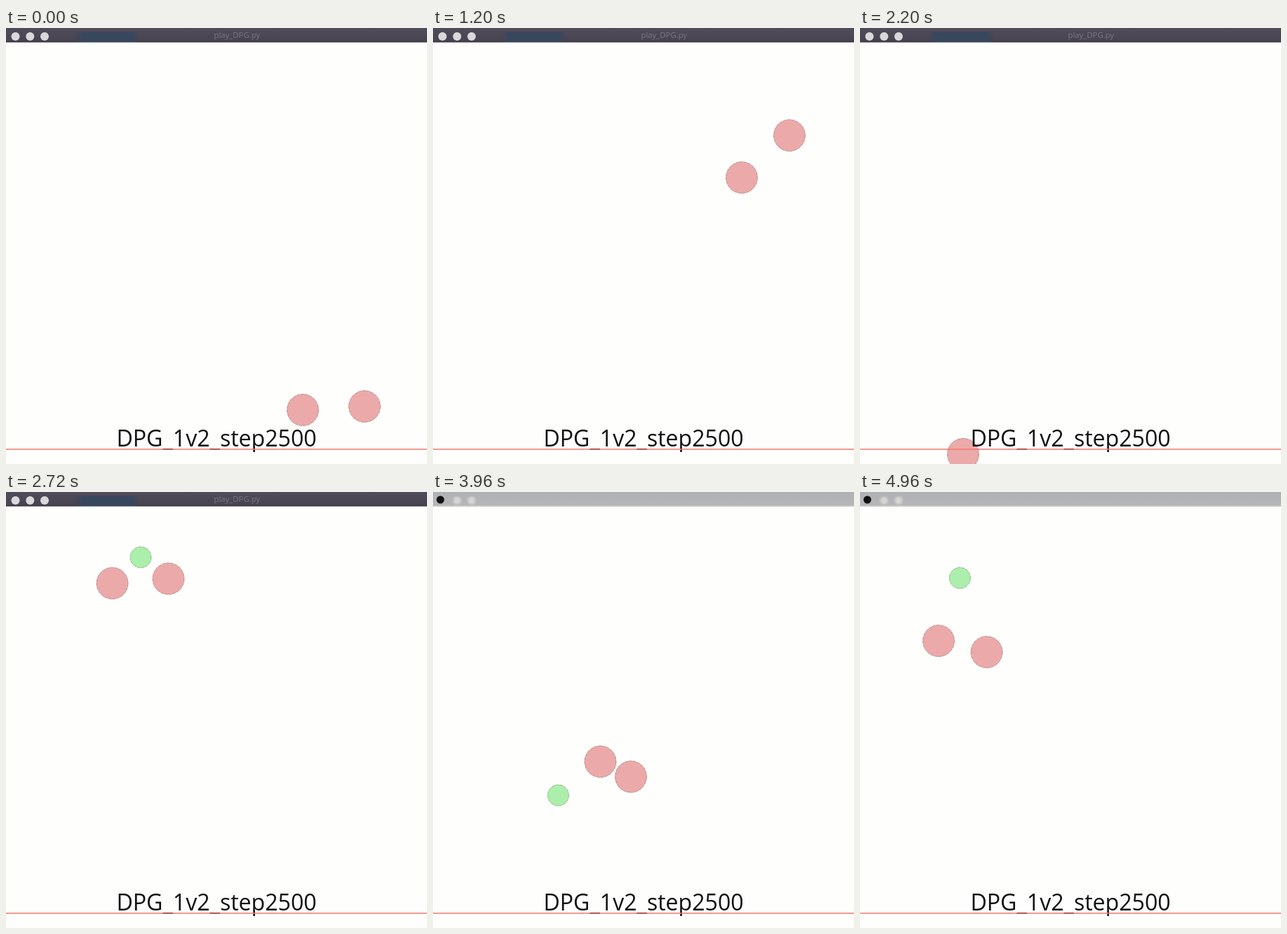
Recreate the animation shown at these times as an HTML page. Size 600 by 621 pixels, loop 5 s.

```html
<!DOCTYPE html>
<html lang="en">
<head>
<meta charset="utf-8">
<title>play_DPG.py</title>
<style>
  html, body { margin: 0; width: 100%; height: 100%; overflow: hidden; background: #fefefd; }
  svg { display: block; width: 600px; height: 621px; }
  text { font-family: "Open Sans", "Noto Sans", sans-serif; }
  .agent { stroke-width: .8; stroke-dasharray: 5 1; }
  .hunter { fill: rgba(217, 89, 86, .5); stroke: rgba(108, 45, 45, .5); }
  .runner { fill: rgba(89, 221, 89, .5); stroke: rgba(45, 108, 45, .5); }
</style>
</head>
<body>
<svg viewBox="0 0 600 621">
  <defs>
    <linearGradient id="dark" x2="0" y2="1">
      <stop offset="0" stop-color="#504c59"/>
      <stop offset=".85" stop-color="#484452"/>
      <stop offset="1" stop-color="#3a3744"/>
    </linearGradient>
    <linearGradient id="light" x2="0" y2="1">
      <stop offset="0" stop-color="#b0b1b4"/>
      <stop offset=".88" stop-color="#b5b6b8"/>
      <stop offset="1" stop-color="#d8d8d8"/>
    </linearGradient>
    <linearGradient id="tint">
      <stop offset="0" stop-color="#37475c" stop-opacity="0"/>
      <stop offset=".15" stop-color="#37475c"/>
      <stop offset=".85" stop-color="#37475c"/>
      <stop offset="1" stop-color="#37475c" stop-opacity="0"/>
    </linearGradient>
    <filter id="soft"><feGaussianBlur stdDeviation="1.6"/></filter>
  </defs>

  <rect width="600" height="621" fill="#fefefd"/>
  <circle class="agent hunter" r="22.5"/>
  <circle class="agent hunter" r="22.5"/>
  <circle class="agent runner" r="15"/>

  <text x="157.4" y="596" font-size="32.1" fill="#111">DPG_1v2_step2500</text>
  <path d="M0 600H600" stroke="#f4766f" stroke-width="1.6"/>

  <rect width="600" height="20.5" fill="url(#dark)"/>
  <rect x="96" y="6" width="96" height="14" fill="url(#tint)"/>
  <g fill="#d9d9d9">
    <circle cx="13.5" cy="12" r="6"/>
    <circle cx="34.3" cy="12" r="6"/>
    <circle cx="55" cy="12" r="6"/>
  </g>
  <text x="329.3" y="14" font-size="11.3" fill="#777983" text-anchor="middle">play_DPG.py</text>

  <g id="menu">
    <rect width="600" height="21" fill="url(#light)"/>
    <g fill="#d6d6d3" filter="url(#soft)">
      <circle cx="34.3" cy="12" r="5.5"/>
      <circle cx="55" cy="12" r="5.5"/>
    </g>
    <circle cx="10.5" cy="11" r="5.5" fill="#111"/>
  </g>
</svg>
<script>
  const LOOP = 5000, STEP = 40;

  // Turning points of the chase, and how far each leg swings off its straight line
  const times = [0, 1200, 1720, 2720, 3320, 3960, 4960];
  const swings = [[0, 270], [-60, -130], [0, 445], [0, 0], [0, 20], [0, 0]];
  const routes = [
    "423,544 440,213 69,445 151.5,130 170,410 238.5,384 112,212",
    "511,539 508,153 69,357 231.5,123.5 232,415.5 282,405.5 180.5,228",
    "640,640 640,-60 109,534 192,93 202.7,434.7 178.5,432 142.4,122.5"
  ].map(r => r.split(" ").map(p => p.split(",").map(Number)));

  const clamp = x => Math.min(Math.max(x, 0), 1);

  // Straight leg plus a bulge that peaks a little past halfway
  function place(route, t) {
    const i = Math.max(times.findLastIndex((s, n) => s <= t && n < swings.length), 0);
    const u = clamp((t - times[i]) / (times[i + 1] - times[i]));
    const bulge = Math.sin(Math.PI * u ** 1.4) ** 2;
    return route[i].map((a, k) => a + (route[i + 1][k] - a) * u + swings[i][k] * bulge);
  }

  const agents = document.querySelectorAll(".agent");
  const menu = document.getElementById("menu");

  function draw(now) {
    const t = Math.floor(now % LOOP / STEP) * STEP;
    agents.forEach((c, n) => {
      const [x, y] = place(routes[n], t);
      c.setAttribute("cx", x);
      c.setAttribute("cy", y);
    });
    menu.setAttribute("opacity", clamp((t - 3600) / 200));
    requestAnimationFrame(draw);
  }
  draw(performance.now());
</script>
</body>
</html>
```
